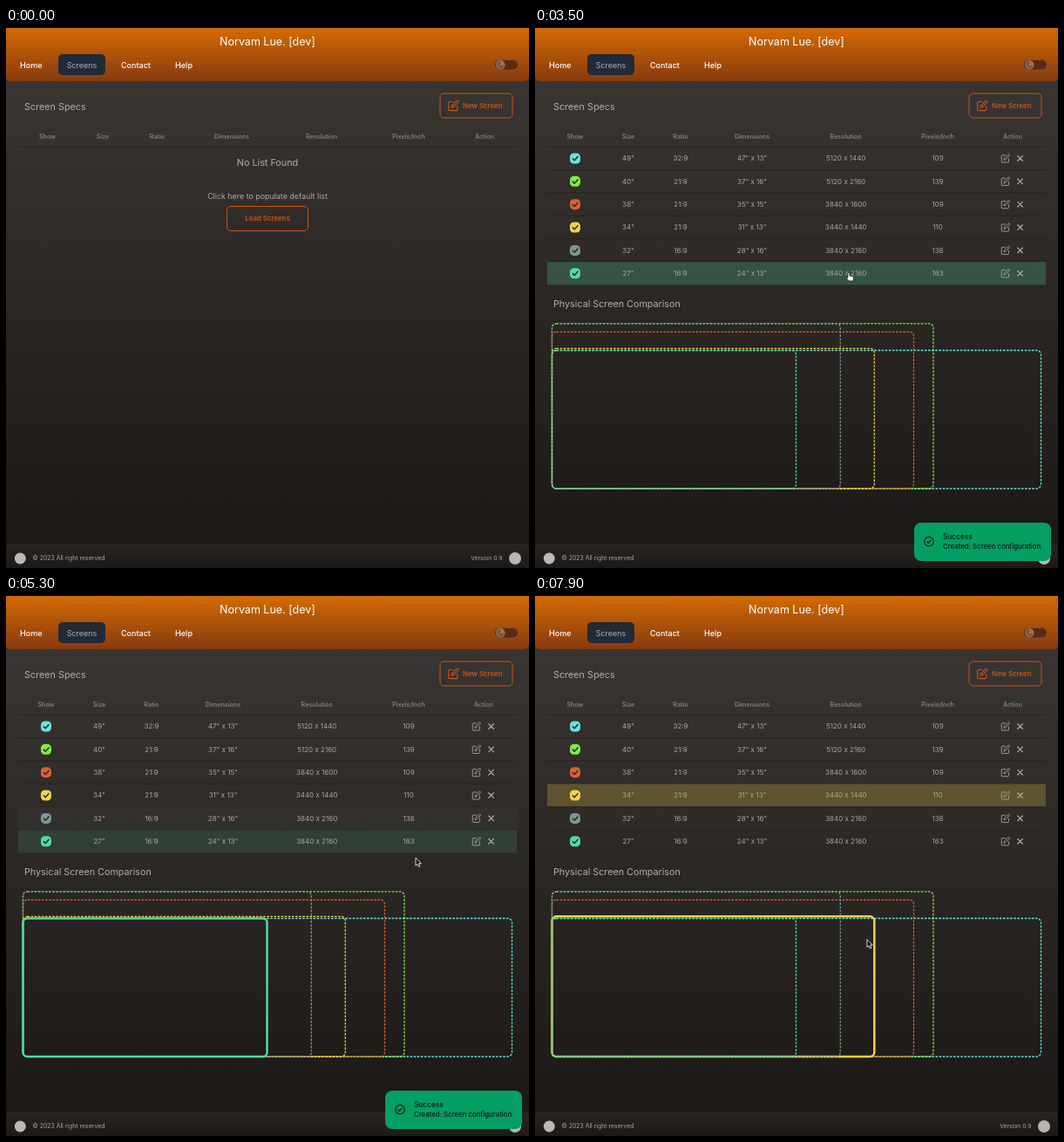
Recreate the animation shown at these times as an HTML page. Size 600 px wide and 619 px high, loop 8 s.

```html
<!DOCTYPE html>
<html lang="en">
<head>
<meta charset="utf-8">
<title>Screen comparison</title>
<style>
  html, body { margin: 0; width: 100%; height: 100%; overflow: hidden; background: #1b1816; }
  svg { display: block; width: 100vw; height: 100vh; font-family: Inter, "Open Sans", sans-serif; }
</style>
</head>
<body>
<svg id="stage" viewBox="0 0 600 619"></svg>
<script>
const LOOP = 8000, CLICK = 1700, LOADED = 2800, FIRST_MOVE = 3600;
const ORANGE = '#cb531b', GREY = '#aaa5a2', DIM = '#847e7a';
const ROW_TOP = 136.3, ROW_H = 26.35, BASE = 528;

// size, ratio, dimensions, resolution, density, colour, right edge, top edge
const screens = [
  ['49"', '32:9', '47" x 13"', '5120 x 1440', '109', '#68e6d8', 580.5, 369.5],
  ['40"', '21:9', '37" x 16"', '5120 x 2160', '139', '#86ea45', 457, 338.8],
  ['38"', '21:9', '35" x 15"', '3840 x 1600', '109', '#dd622f', 434.5, 348.3],
  ['34"', '21:9', '31" x 13"', '3440 x 1440', '110', '#f3d244', 389.3, 367.3],
  ['32"', '16:9', '28" x 16"', '3840 x 2160', '138', '#7d9891', 350.3, 338.8],
  ['27"', '16:9', '24" x 13"', '3840 x 2160', '163', '#50dda0', 299.5, 369.5]
].map(([size, ratio, dims, res, ppi, color, right, top]) =>
  ({ cells: [size, ratio, dims, res, ppi], color, right, top }));

const headings = ['Show', 'Size', 'Ratio', 'Dimensions', 'Resolution', 'Pixels/Inch', 'Action'];
const emptyCols = [47.5, 111, 173.5, 259, 362, 462, 549];
const filledCols = [46, 107, 167, 249, 356.7, 462, 548];

// time, x, y of the pointer tip
const path = [
  [800, 470, 640], [1400, 330, 230], [1700, 318.7, 217.5], [2300, 318.7, 217.5],
  [2700, 345, 262], [3100, 360, 280], [3520, 360, 280], [3650, 450, 175],
  [3900, 467, 163.6], [4300, 466, 171], [4550, 463, 187], [4700, 462, 193.5],
  [5000, 463, 220], [5300, 470, 300], [5700, 520, 420], [6200, 566, 400],
  [6500, 563.5, 384.5], [6900, 500, 395], [7400, 420, 396], [7700, 382, 394], [8000, 380.5, 393.5]
];

const text = (x, y, size, fill, str, anchor = 'start', weight = 400) =>
  `<text x="${x}" y="${y + size * 0.36}" font-size="${size}" fill="${fill}" text-anchor="${anchor}" font-weight="${weight}">${str}</text>`;
const box = (x, y, w, h, r, attrs) =>
  `<rect x="${x}" y="${y}" width="${w}" height="${h}" rx="${r}" ${attrs}/>`;
const line = (d, color, width, attrs = '') =>
  `<path d="${d}" fill="none" stroke="${color}" stroke-width="${width}" stroke-linecap="round" stroke-linejoin="round" ${attrs}/>`;
const gradient = (id, from, to) =>
  `<linearGradient id="${id}" x2="0" y2="1"><stop stop-color="${from}"/><stop offset="1" stop-color="${to}"/></linearGradient>`;
const editIcon = (x, y, size, color) => line(
  'M11 4H4a2 2 0 0 0-2 2v14a2 2 0 0 0 2 2h14a2 2 0 0 0 2-2v-7M18.5 2.5a2.1 2.1 0 0 1 3 3L12 15l-4 1 1-4z',
  color, 2, `transform="translate(${x - size / 2} ${y - size / 2}) scale(${size / 24})"`);
const headRow = cols => headings.map((h, i) => text(cols[i], 124.3, 7.1, DIM, h, 'middle', 600)).join('');
const separator = y => `<path d="M14 ${y}H586" stroke="#262321"/>`;

function pageFrame() {
  return `<defs>
    ${gradient('page', '#3c3835', '#1a1715')}
    ${gradient('head', '#d36b02', '#873a0f')}
    ${gradient('foot', '#292523', '#1c1917')}
    </defs>
    ${box(0, 0, 600, 619, 0, 'fill="url(#page)"')}
    <path d="M0 0H600V55q0 6-6 6H6q-6 0-6-6z" fill="url(#head)"/>
    <path d="M0 619V597q0-6 6-6H594q6 0 6 6V619z" fill="url(#foot)"/>
    ${text(300, 15, 12.5, '#fff', 'Norvam Lue. [dev]', 'middle')}
    ${box(60, 30, 54, 24, 5, 'fill="#212a36"')}
    ${text(16, 42.3, 9.1, '#fff', 'Home', 'start', 500)}
    ${text(87, 42.3, 9, '#a9b0ba', 'Screens', 'middle')}
    ${text(132, 42.3, 9, '#fff', 'Contact', 'start', 500)}
    ${text(194, 42.3, 9.1, '#fff', 'Help', 'start', 500)}
    ${box(560.5, 36.3, 27, 12, 6, 'fill="#592b12" stroke="#8a5735"')}
    <circle cx="567.3" cy="42.3" r="5.2" fill="#a3714f"/>
    ${line('M566.4 39.3a3.2 3.2 0 1 0 4 4a2.6 2.6 0 0 1-4-4z', '#5c3118', 0.9)}
    ${text(21, 90.3, 10.8, '#b3aeab', 'Screen Specs')}
    ${box(498, 75, 83, 28, 4.5, `fill="none" stroke="${ORANGE}"`)}
    ${editIcon(513.3, 89, 13.5, ORANGE)}
    ${text(524, 89, 7.8, ORANGE, 'New Screen', 'start', 600)}
    ${separator(136.3)}
    <circle cx="16.3" cy="608" r="6.5" fill="#bcb8b4"/>
    <circle cx="584" cy="608" r="7" fill="#b9b5b1"/>
    ${text(30.5, 608, 6.9, '#aaa6a3', '© 2023 All right reserved')}
    ${text(569.5, 608, 6.8, '#aaa6a3', 'Version 0.9', 'end')}`;
}

function emptyView() {
  return `<g id="empty">${headRow(emptyCols)}
    ${text(300, 154.3, 10.8, '#b3aeab', 'No List Found', 'middle')}
    ${text(300, 192.5, 8.9, '#b0aba8', 'Click here to populate default list', 'middle')}
    ${box(253.5, 204.5, 93, 28, 4.5, `id="load" stroke="${ORANGE}"`)}
    <g id="loadText">${text(300, 218.5, 7.8, ORANGE, 'Load Screens', 'middle', 600)}</g>
    <g id="spinner">${line('M5.4 2A5.8 5.8 0 0 1-5.7-1', '#c9a592', 1.5)}</g></g>`;
}

function tableRow(screen, i) {
  const y = ROW_TOP + ROW_H * (i + 0.5);
  return `${box(14, y - ROW_H / 2, 572, ROW_H, 0, `fill="${screen.color}" class="tint"`)}
    ${i < 5 ? separator(y + ROW_H / 2) : ''}
    ${box(40, y - 6, 12, 12, 4.5, `fill="${screen.color}"`)}
    ${line(`M43.3 ${y + 0.3}l2 2 3.7-4.2`, '#1f2937', 1.5)}
    ${screen.cells.map((c, k) => text(filledCols[k + 1], y, 8, GREY, c, 'middle')).join('')}
    ${editIcon(539.8, y, 11, GREY)}
    ${line(`M553.8 ${y - 2.8}l5.6 5.6m0-5.6l-5.6 5.6`, GREY, 1.3)}`;
}

function filledView() {
  const outline = s => box(19.5, s.top, s.right - 19.5, BASE - s.top, 5,
    `fill="none" stroke="${s.color}" class="outline"`);
  return `<g id="filled">${headRow(filledCols)}
    ${screens.map(tableRow).join('')}
    ${text(21, 316.3, 10.75, '#b3aeab', 'Physical Screen Comparison')}
    ${screens.map(outline).join('')}</g>`;
}

function overlays() {
  return `<g id="toast">${box(435, 567, 157, 44, 8, 'fill="#059e63"')}
    <circle cx="452" cy="588.7" r="5.3" fill="none" stroke="#10231b" stroke-width="1.2"/>
    ${line('M449.7 588.9l1.6 1.6 3-3.3', '#10231b', 1.2)}
    ${text(468, 582.7, 8.3, '#0c1a14', 'Success', 'start', 500)}
    ${text(468, 594.5, 7.8, '#0c1a14', 'Created: Screen configuration', 'start', 500)}</g>
    <g id="cursor">
    <path id="arrow" d="M0 0V9L2 7.2 3.5 10.4 5 9.7 3.6 6.6H6.4z" fill="#111" stroke="#e8e8e8" stroke-width=".9"/>
    <path id="hand" d="M-1 .8Q0-.7 1 .8V4l3.6.9q1.1.4.9 1.6L4.8 10H.2L-2.6 6.8q-.3-1.3 1.6-.6z" fill="#fff" stroke="#222" stroke-width=".8"/>
    </g>`;
}

const stage = document.getElementById('stage');
stage.innerHTML = pageFrame() + emptyView() + filledView() + overlays();
const el = id => document.getElementById(id);
const [empty, filled, load, loadText, spinner, toast, cursor, arrow, hand] =
  ['empty', 'filled', 'load', 'loadText', 'spinner', 'toast', 'cursor', 'arrow', 'hand'].map(el);
const tints = [...stage.querySelectorAll('.tint')];
const outlines = [...stage.querySelectorAll('.outline')];

const ramp = (t, from, to) => {
  const p = Math.min(1, Math.max(0, (t - from) / (to - from)));
  return p * p * (3 - 2 * p);
};
const show = (node, on) => node.setAttribute('display', on ? 'inline' : 'none');

function pointer(t) {
  const i = Math.max(1, path.findIndex(p => p[0] > t));
  const [a, b] = [path[i - 1], path[i]];
  const p = ramp(t, a[0], b[0]);
  return [a[1] + (b[1] - a[1]) * p, a[2] + (b[2] - a[2]) * p];
}

const rowAt = (x, y) => {
  const i = Math.floor((y - ROW_TOP) / ROW_H);
  return x > 14 && x < 586 && i >= 0 && i < screens.length ? i : -1;
};

// Row under the pointer, or else the topmost outline around it
function hovered(t) {
  if (t < LOADED) return -1;
  const [x, y] = pointer(t);
  const row = rowAt(x, y);
  return row >= 0 ? row : screens.findLastIndex(s => x > 19 && x < s.right && y > s.top && y < BASE);
}

// Share of the last moments spent on each row gives its fade
function tintLevels(t) {
  const levels = screens.map(() => 0), steps = 18;
  for (let k = 0; k < steps; k++) {
    const i = hovered(t - k * 10);
    if (i >= 0) levels[i] += 1 / steps;
  }
  return levels;
}

function render(t) {
  const [x, y] = pointer(t);
  const ready = t >= LOADED, loading = t >= CLICK && !ready;
  const onButton = !ready && x > 253 && x < 347 && y > 204 && y < 233;

  show(empty, !ready);
  show(filled, ready);
  show(loadText, !loading);
  show(spinner, loading);
  load.setAttribute('fill', loading || onButton ? '#6d3718' : 'none');
  load.setAttribute('stroke', loading ? '#98481f' : ORANGE);
  spinner.setAttribute('transform', `translate(300 218.5) rotate(${(t - 2000) * 0.36})`);

  tintLevels(t).forEach((v, i) => tints[i].setAttribute('opacity', v * 0.24));
  const bold = t >= FIRST_MOVE ? hovered(t - 120) : -1;
  outlines.forEach((o, i) => {
    o.setAttribute('stroke-width', i === bold ? 2.5 : 1.3);
    o.setAttribute('stroke-dasharray', i === bold ? 'none' : '2.6 1.5');
  });

  const shown = ramp(t, LOADED, LOADED + 250) * (1 - ramp(t, 7500, 7720));
  toast.setAttribute('opacity', shown);
  toast.setAttribute('transform', `translate(0 ${(1 - shown) * 24})`);

  const clickable = ready ? rowAt(x, y) >= 0 : onButton && !loading;
  show(cursor, t >= path[0][0]);
  show(hand, clickable);
  show(arrow, !clickable);
  cursor.setAttribute('transform', `translate(${x} ${y})`);
}

const start = performance.now();
function tick() {
  render((performance.now() - start) % LOOP);
  requestAnimationFrame(tick);
}
tick();
</script>
</body>
</html>
```
